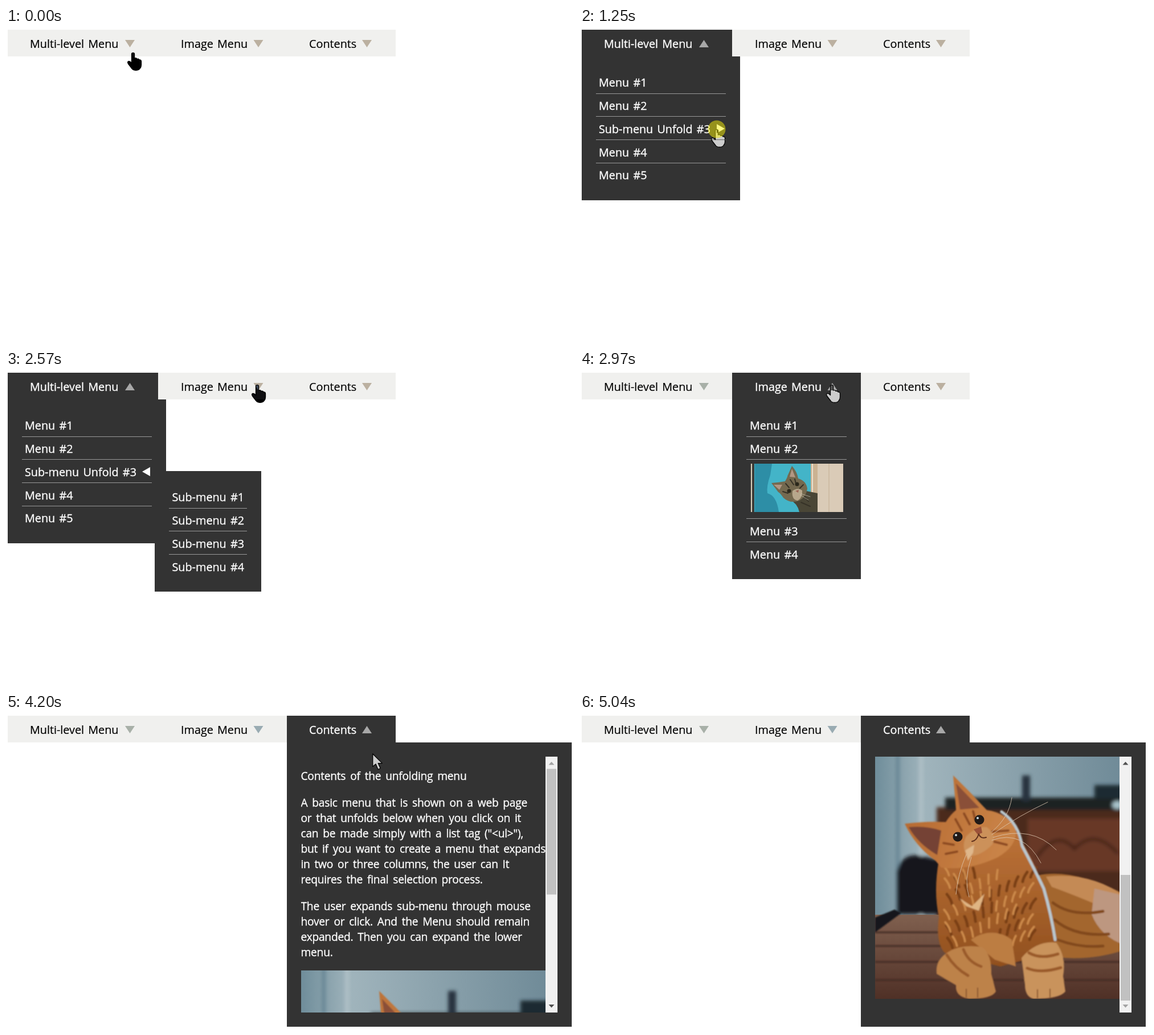
An HTML page for the animation above (5170 ms loop, 997 px wide and 554 px high).

```html
<!DOCTYPE html>
<html lang="en">
<head>
<meta charset="utf-8">
<title>Menu demo</title>
<style>
html, body { margin: 0; width: 100%; height: 100%; overflow: hidden; background: #fff; }
#stage { display: block; width: 997px; height: 554px; isolation: isolate; }
text { font: 19.8px "Open Sans", "Noto Sans", sans-serif; word-spacing: 2px; fill: #000; stroke: #000; stroke-width: .2px; }
.panel text, .open > text { fill: #fff; stroke: #fff; stroke-width: .35px; }
.page text { font-size: 19.2px; letter-spacing: -.25px; word-spacing: 3.2px; }
.tab > rect { fill: #f0f0ee; }
.open > rect, .panel > .back { fill: #333; }
.arrow { fill: #bbb0a0; transform-box: fill-box; transform-origin: center; }
.used > .arrow { fill: var(--used); }
.open > .arrow { fill: #a8a8a8; transform: rotate(180deg); }
.panel { display: none; }
.open + .panel, .panel.shown { display: inline; }
.rule { fill: #999; }
.invert { fill: #fff; mix-blend-mode: difference; }
.outline { fill: none; stroke: #000; stroke-width: 1.3; stroke-linejoin: round; }
</style>
</head>
<body>
<svg id="stage" viewBox="0 0 997 554">
  <defs>
    <linearGradient id="wall"><stop stop-color="#6f8d9a"/><stop offset=".2" stop-color="#a0b4bc"/><stop offset="1" stop-color="#708b98"/></linearGradient>
    <linearGradient id="wood" x2="0" y2="1"><stop stop-color="#80604f"/><stop offset="1" stop-color="#4f3026"/></linearGradient>
    <linearGradient id="fur" x2="0" y2="1"><stop stop-color="#bd7338"/><stop offset="1" stop-color="#91501f"/></linearGradient>
    <linearGradient id="face" x2="1" y2=".3"><stop stop-color="#b4672f"/><stop offset="1" stop-color="#c98347"/></linearGradient>
    <filter id="soft"><feGaussianBlur stdDeviation="3"/></filter>
    <filter id="fluffy"><feGaussianBlur stdDeviation="1.3"/></filter>
    <path id="hand" d="M-2.500 2.500Q-2.500 .6 0 .6T2.500 2.500V10Q6 9 7 11.500Q10 10.500 11 13Q14.500 12.500 14.500 16V22Q14.500 26 12 28.500Q10 31.500 5 31.500T-2 28.500L-8.500 20Q-10.500 16.500 -8 15.500Q-5.500 15 -2.500 18.500Z"/>
    <path id="pointer" d="M.7 1V23.500L6 19L10 28.500L14.200 26.500L10.200 17.600H17.300Z"/>
  </defs>
  <rect width="997" height="554" fill="#fff"/>
  <g id="menus"></g>
  <g id="cursor"><use class="invert"/><use class="outline"/></g>
  <circle id="click" r="15.500" fill="rgb(250,242,5)" fill-opacity=".5"/>
</svg>
<script>
const $ = s => document.querySelector(s);
const rect = (x, y, w, h, attrs = '') => `<rect x="${x}" y="${y}" width="${w}" height="${h}" ${attrs}/>`;
const path = (d, fill) => `<path d="${d}" fill="${fill}"/>`;
const stroke = (d, color, width) => `<path d="${d}" fill="none" stroke="${color}" stroke-width="${width}" stroke-linecap="round"/>`;
const text = (x, y, s) => `<text x="${x}" y="${y}">${s}</text>`;
const back = (x, y, w, h) => rect(x, y, w, h, 'class="back"');
const rules = (x, w, ys) => ys.map(y => rect(x, y, w, 1, 'class="rule"')).join('');
const items = (x, ys, label) => ys.map((y, i) => text(x, y, `${label} #${i + 1}`)).join('');

const tab = (x, w, label, labelX, arrowX, used) => `<g class="tab" style="--used:${used}">
  ${rect(x, 3, w, 47)}${text(labelX, 35, label)}
  <path class="arrow" d="M${arrowX - 8.5} 21h17l-8.500 13z"/></g>`;
const panel = (body, id) => `<g class="panel" ${id ? `id="${id}"` : ''}>${body}</g>`;

const tabby = `<svg x="299" y="163" width="163" height="85" viewBox="0 0 163 85">
  ${rect(0, 0, 163, 85, 'fill="#43b4c8"')}
  ${path('M8 0H38L35 20Q28 40 30 52Q46 56 50 85H8Z', '#2d8ea6')}
  ${rect(0, 0, 7, 85, 'fill="#3c3a36"')}${rect(1, 0, 2, 85, 'fill="#d8d0bd"')}
  ${rect(106, 0, 12, 85, 'fill="#cbb292"')}${rect(118, 0, 45, 85, 'fill="#dacbb7"')}
  ${rect(108, 0, 2, 50, 'fill="#eadfce"')}${rect(137, 0, 2, 85, 'fill="#cfbca5"')}
  ${path('M68 62Q85 70 98 48L118 52V85H86Q83 70 68 62Z', '#4a4636')}
  ${path('M37 34Q50 33 61 31Q66 22 65 22L73 4Q82 14 84 26Q98 30 100 44Q98 58 86 65Q70 71 58 60Q52 51 49 50Z', '#74694f')}
  ${path('M41 37L56 37L51 46Z', '#b29783')}${path('M73 9L79 24L69 23Z', '#b29783')}
  ${stroke('M70 28L76 37M78 27L80 35M62 35L68 42M57 49L66 52M93 37L87 43M95 58L102 66M89 68L105 75', '#363227', 2)}
  ${path('M74 48Q83 41 91 47Q92 60 83 65Q72 63 74 48Z', '#b7a78c')}
  <circle cx="68" cy="48" r="3.500" fill="#2b281b"/><circle cx="82" cy="36" r="3.500" fill="#2b281b"/>
  ${path('M79 48L85 46L84 51Z', '#9a6354')}
  ${stroke('M89 53L105 58M88 55L102 64', '#d9d5c6', .6)}
</svg>`;

const planks = [310, 334, 362, 394].map(y => rect(0, y, 429, 4, 'fill="#432a22" opacity=".7"')).join('');
const tufts = (count, phase) => Array.from({length: count}, (_, i) => {
  const x = 120 + (i * 47 + phase) % 172, y = 195 + (i * 31 + phase) % 132;
  return `M${x} ${y}q${(200 - x) * .1} 9 ${(200 - x) * .12} 17`;
}).join('');
const ginger = `<svg x="518" y="451" width="429" height="429" viewBox="0 0 429 429">
  ${rect(0, 0, 429, 429, 'fill="url(#wall)"')}
  <g filter="url(#soft)">
    ${rect(36, -9, 7, 300, 'fill="#698796"')}${rect(78, -9, 5, 300, 'fill="#b5c5ca"')}
    ${path('M108 92H440V350H108Z', '#4c291d')}${rect(268, 112, 170, 92, 'fill="#673725"')}
    ${stroke('M285 178Q320 130 350 165Q385 128 425 172', '#422319', 5)}
    ${path('M123 75H440V97H123Z', '#1b2024')}${rect(258, 36, 14, 45, 'fill="#25333c"')}
    ${rect(385, 53, 50, 24, 'fill="#1d2930"')}<ellipse cx="425" cy="88" rx="9" ry="7" fill="#a9c4cc"/>
    ${path('M38 280V205Q48 170 82 178L115 185V280Z', '#17191b')}
  </g>
  ${rect(0, 281, 429, 148, 'fill="url(#wood)"')}
  <g filter="url(#fluffy)">
    ${planks}
    ${path('M0 286L34 272L46 278L0 312Z', '#16181a')}
    ${path('M285 212Q345 198 440 246V342Q385 362 320 356Z', '#a3662f')}
    ${path('M300 214Q380 205 440 250V285Q360 250 310 232Z', '#c48a55')}
    ${path('M385 235L440 248V335Q395 320 380 280Z', '#bd9780')}
    ${stroke('M312 260Q345 285 400 275M315 290Q350 320 410 315M320 325Q360 340 400 336', '#82481f', 5)}
    ${path('M112 185Q102 240 112 285Q106 330 122 348L220 372L318 345Q318 285 292 222Q275 180 245 130Z', 'url(#fur)')}
    ${stroke(tufts(30, 20), '#7a3f17', 5)}
    ${stroke(tufts(34, 0), '#cd8b4b', 3.5)}
    ${path('M148 252L170 266L192 244L182 274L160 266Z', '#e0b583')}
    ${path('M168 325Q205 300 240 325L247 372L210 360Z', '#bc7d42')}
    ${path('M52 121Q92 116 124 118Q132 105 142 97L137 36Q168 66 196 97Q232 102 247 130Q250 160 215 180Q165 204 116 198L106 186Q70 160 52 121Z', 'url(#face)')}
    ${path('M59 127Q90 124 116 133L109 176Q75 156 59 127Z', '#754334')}${path('M142 50L149 96L183 93Z', '#8a5038')}
    ${stroke('M141 113L152 133M156 103L166 122M172 99L176 115M120 155L138 158M124 174L144 170M205 135L234 133M203 151L231 158', '#8c4a20', 4)}
    ${path('M160 143Q178 125 196 127Q214 140 206 157Q187 178 163 178Q150 163 160 143Z', '#cc915a')}
    ${path('M158 168L174 158L172 172L163 186Z', '#dfb78b')}
    ${path('M126 348Q150 332 188 338Q205 352 204 385L212 416Q205 429 165 429Q140 425 142 405L108 385Q105 362 126 348Z', '#bd824a')}
    ${path('M257 357Q283 326 318 330Q336 355 330 389L334 416Q324 429 278 429Q263 425 263 404Z', '#c9935b')}
    ${stroke('M126 352Q140 375 163 388M155 342Q163 364 186 372M270 348Q290 360 321 350M267 375Q290 385 326 374', '#9a5a2a', 5)}
    ${stroke('M160 412v14M180 410v16M285 413v14M307 412v14', '#88552f', 2)}
    ${stroke('M222 100Q252 120 258 160Q282 205 296 235Q309 280 316 325', '#b9c8cf', 5)}
  </g>
  <circle cx="145" cy="144" r="8.500" fill="#211a17"/><circle cx="183" cy="114" r="8.500" fill="#211a17"/>
  <circle cx="142" cy="141" r="2" fill="#cfdae0"/><circle cx="180" cy="111" r="2" fill="#cfdae0"/>
  ${path('M173 131L186 126L188 137L180 140Z', '#9b5138')}${stroke('M182 139Q185 148 195 145M182 139Q178 151 170 152', '#5f2f1b', 2)}
  ${stroke('M205 140Q255 105 303 83M207 145Q275 123 318 167M205 150Q260 130 291 190M205 135Q235 110 240 75M160 175Q145 210 142 245M169 180Q155 220 165 250', '#dfc9b4', .8)}
</svg>`;

const lines = [
  [116, 'Contents of the unfolding menu'],
  [163, 'A basic menu that is shown on a web page'],
  [190, 'or that unfolds below when you click on it'],
  [217, 'can be made simply with a list tag ("&lt;ul&gt;"),'],
  [244, 'but if you want to create a menu that expands'],
  [271, 'in two or three columns, the user can It'],
  [298, 'requires the final selection process.'],
  [345, 'The user expands sub-menu through mouse'],
  [372, 'hover or click. And the Menu should remain'],
  [399, 'expanded. Then you can expand the lower'],
  [426, 'menu.']
];

$('#menus').innerHTML =
  tab(3, 264, 'Multi-level Menu', 42, 217.5, '#a8b0a8') +
  panel(back(3, 50, 278, 253) + rules(28, 228, [115, 155, 196, 237]) +
    [103, 144, 185, 226, 266].map((y, i) => text(33, y, `${i === 2 ? 'Sub-menu Unfold' : 'Menu'} #${i + 1}`)).join('') +
    '<path id="fold" fill="#fff"/>') +
  tab(267, 226, 'Image Menu', 307, 443, '#99abb2') +
  panel(back(267, 50, 226, 316) + rules(292, 176, [115, 155, 259, 300]) + items(298, [103, 144, 289, 330], 'Menu') + tabby) +
  tab(493, 191, 'Contents', 532, 633.5, '#bbb0a0') +
  panel(back(493, 50, 500, 500) +
    `<svg class="page" id="page" x="518" y="75" width="429" height="450">${lines.map(([y, s]) => text(517.5, y, s)).join('')}${ginger}</svg>` +
    rect(947, 75, 21, 450, 'fill="#f1f1f1"') + rect(949, 0, 17, 221, 'id="thumb" fill="#c1c1c1"') +
    '<path id="upKey" d="M952.500 89.500h10l-5-5.500z"/><path id="downKey" d="M952.500 511h10l-5 5.500z"/>') +
  panel(back(261, 176, 187, 212) + rules(286, 137, [241, 281, 322]) + items(291.5, [229, 270, 311, 352], 'Sub-menu'), 'sub');

// Runs of evenly spaced picture changes: first, last, count
const runs = [[0, 0, 1], [70, 560, 8], [630, 1050, 7], [1250, 1250, 1], [1380, 1730, 6], [1800, 1870, 2],
  [2020, 2500, 8], [2570, 2570, 1], [2900, 3240, 6], [3380, 3870, 8], [4000, 4000, 1], [4130, 4480, 6], [4550, 5040, 8]];
const moments = runs.flatMap(([a, b, n]) => Array.from({length: n}, (_, i) => Math.round(a + (n > 1 ? (b - a) * i / (n - 1) : 0))));

// Keys: time, then values
const cursorKeys = [[0, 223, 43], [140, 220, 31], [210, 220, 31], [560, 230, 100], [1050, 240, 178], [1380, 240, 178],
  [1730, 443, 52], [1870, 445, 48], [2020, 447, 46], [2500, 442, 25], [2570, 441, 24], [2968, 442, 24], [3240, 683, 37],
  [3380, 678, 35], [3730, 633, 16], [3870, 631, 20], [4130, 631, 20], [4480, 692, 266], [4830, 692, 266], [4970, 692, 516], [5170, 692, 516]];
const scrollKeys = [[0, 0], [4480, 0], [4690, 126], [4970, 365], [5040, 379], [5170, 379]];
const clicks = [[140, 210], [1250, 1380], [2900, 2967], [4000, 4130]];

function at(keys, t) {
  const i = Math.max(1, keys.findIndex(k => k[0] > t));
  const a = keys[i - 1], b = keys[i], p = (t - a[0]) / (b[0] - a[0]);
  return a.slice(1).map((v, n) => v + (b[n + 1] - v) * p);
}

const tabs = [...document.querySelectorAll('.tab')];
const cursorParts = [...document.querySelectorAll('#cursor use')];

function draw(time) {
  const t = moments.findLast(m => m <= time);
  const open = [210, 2967, 4130].findLastIndex(m => t >= m);
  tabs.forEach((el, i) => {
    el.classList.toggle('open', i === open);
    el.classList.toggle('used', i < open);
  });
  const unfolded = t >= 1380;
  $('#sub').classList.toggle('shown', unfolded && open === 0);
  $('#fold').setAttribute('d', unfolded ? 'M253 169v16l-14-8z' : 'M240 169v16l14-8z');

  const [scroll] = at(scrollKeys, t);
  $('#page').setAttribute('viewBox', `518 ${75 + scroll} 429 450`);
  $('#thumb').setAttribute('y', 96.5 + scroll * 186.5 / 379);
  $('#upKey').setAttribute('fill', scroll > 0 ? '#505050' : '#a3a3a3');
  $('#downKey').setAttribute('fill', scroll < 379 ? '#505050' : '#a3a3a3');

  const [x, y] = at(cursorKeys, t).map(Math.round);
  const shape = open === 2 && y > 50 ? '#pointer' : '#hand';
  cursorParts.forEach(el => {
    el.setAttribute('href', shape);
    el.setAttribute('transform', `translate(${x} ${y})`);
    el.style.display = t >= 5040 ? 'none' : '';
  });
  const click = $('#click');
  click.setAttribute('cx', x);
  click.setAttribute('cy', y);
  click.style.display = clicks.some(([a, b]) => t >= a && t < b) ? '' : 'none';
}

const start = performance.now();
function tick() {
  draw((performance.now() - start) % 5170);
  requestAnimationFrame(tick);
}
tick();
</script>
</body>
</html>
```
